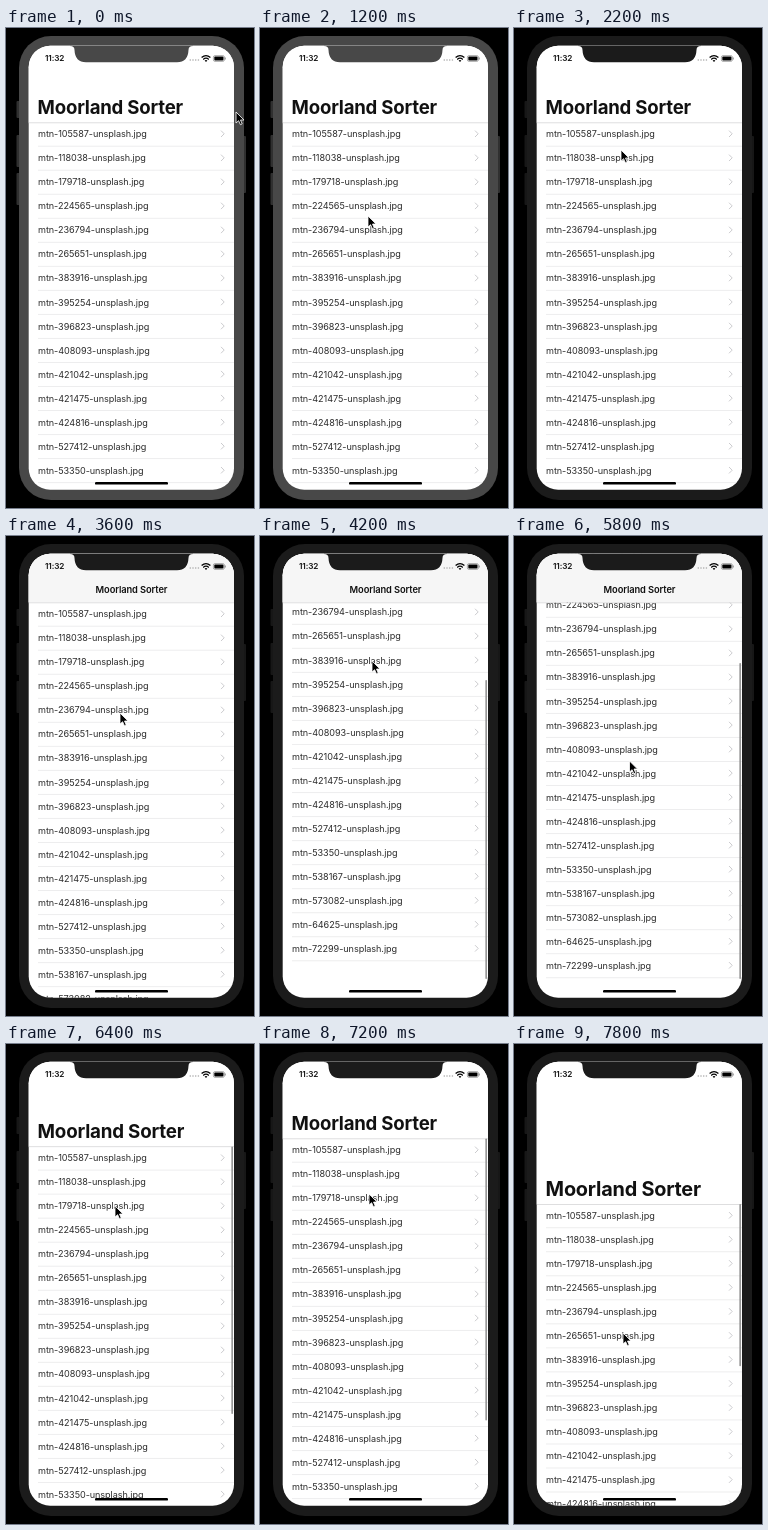
Animation of 248 by 480 pixels, one loop 8 s. Source, as an HTML page:

```html
<!DOCTYPE html>
<html lang="en">
<head>
<meta charset="utf-8">
<title>Phone list scrolling</title>
<style>
  html, body { margin: 0; width: 100%; height: 100%; overflow: hidden; background: #000; }
  svg { display: block; width: 100%; height: 100%; }
  text { font-family: Inter, Roboto, sans-serif; fill: #111; }
  .row text { font-size: 9.1px; letter-spacing: -.07px; fill: #2c2c2c; }
  .row path { fill: none; stroke: #c6c6c9; stroke-width: .9; }
  .row line { stroke: #e6e6e7; stroke-width: .7; }
  #bigTitle { font-size: 18.6px; font-weight: 700; letter-spacing: -.2px; }
  #smallTitle { font-size: 9.3px; font-weight: 600; letter-spacing: -.1px; text-anchor: middle; }
  .clock { font-size: 8.2px; font-weight: 600; letter-spacing: -.1px; }
</style>
</head>
<body>
<svg viewBox="0 0 248 480">
  <defs>
    <clipPath id="screen"><rect x="22.7" y="17.8" width="205.3" height="443.9" rx="21.4"/></clipPath>
  </defs>
  <rect width="248" height="480"/>
  <g id="buttons">
    <rect x="10.5" y="73" width="4" height="17" rx="1"/>
    <rect x="10.5" y="107" width="4" height="32" rx="1"/>
    <rect x="10.5" y="145" width="4" height="32" rx="1"/>
    <rect x="236" y="108" width="4" height="57" rx="1"/>
  </g>
  <rect class="bezel" x="13" y="8" width="225" height="464" rx="32"/>
  <g clip-path="url(#screen)">
    <rect x="22" y="17" width="207" height="446" fill="#fff"/>
    <g id="list"></g>
    <rect id="header" x="22" y="17" width="207" fill="#fff"/>
    <text id="bigTitle">Moorland Sorter</text>
    <rect id="bar" x="22" y="17" width="207" height="49" fill="#f6f6f6"/>
    <text id="smallTitle" x="125.5" y="57.4">Moorland Sorter</text>
    <rect id="headerLine" x="22" width="207" height=".7" fill="#d0d0d2"/>
    <rect id="thumb" x="225.4" width="1.5" rx=".7" fill="#8c8c8c"/>
    <text class="clock" x="39" y="33.2">11:32</text>
    <g fill="#aaa">
      <circle cx="184.3" cy="32" r=".8"/><circle cx="187" cy="32" r=".8"/>
      <circle cx="189.7" cy="32" r=".8"/><circle cx="192.4" cy="32" r=".8"/>
    </g>
    <g fill="none" stroke="#000" stroke-width="1.3">
      <path d="M195.6 29.6Q200 25.6 204.4 29.6M197.2 31.4Q200 29 202.8 31.4"/>
      <path d="M198.6 32.4L200 34L201.4 32.4Q200 31.4 198.6 32.4Z" fill="#000" stroke="none"/>
      <rect x="207.4" y="27.6" width="11" height="5.8" rx="1.6" stroke="#777" stroke-width=".6"/>
      <rect x="208.3" y="28.5" width="9.2" height="4" rx=".9" fill="#000" stroke="none"/>
      <path d="M219.3 29.5v2" stroke="#777" stroke-width=".8"/>
    </g>
    <rect x="89" y="454.1" width="73" height="2.5" rx="1.2"/>
    <path class="bezel" d="M64 17V18Q68.5 18 68.5 22Q69 34.3 80 34.3H171Q182 34.3 182.5 22Q182.5 18 187 18V17Z"/>
  </g>
  <g id="cursor">
    <path d="M0 0V11L2.6 8.7L4.4 12.7L6.2 11.9L4.5 8H8Z" stroke="#fff" stroke-width=".8" stroke-linejoin="round"/>
  </g>
</svg>
<script>
const LOOP = 8000, STEP = 200, ROW = 24.03;
const COLLAPSE = 28, MAX_SCROLL = 109, LIST_END = 443;
const $ = id => document.getElementById(id);
const set = (id, attrs) => {
  for (const name in attrs) $(id).setAttribute(name, attrs[name]);
};
const clamp = v => Math.min(1, Math.max(0, v));
const span = (t, from, to) => clamp((t - from) / (to - from));
const smooth = p => p * p * (3 - 2 * p);
const backOut = (p, bounce) => 1 + (bounce + 1) * (p - 1) ** 3 + bounce * (p - 1) ** 2;

const photos = `105587 118038 179718 224565 236794 265651 383916 395254 396823 408093
  421042 421475 424816 527412 53350 538167 573082 64625 72299`.split(/\s+/);
$('list').innerHTML = photos.map((id, i) => `
  <g class="row" transform="translate(0 ${105.8 + i * ROW})">
    <text x="32" y="3.5">mtn-${id}-unsplash.jpg</text>
    <path d="M215 -3.2L218.2 0L215 3.2"/>
    <line x1="32" x2="229" y1="12.4" y2="12.4"/>
  </g>`).join('');

// Collapse, flick to the end, flick back to the top, pull down.
function scrollAt(t) {
  return (t >= 2400 ? COLLAPSE : 0)
    + (MAX_SCROLL - COLLAPSE) * backOut(span(t, 3600, 4600), 2.85)
    - MAX_SCROLL * backOut(span(t, 5800, 7000), 1.58)
    - 65.5 * span(t, 7200, 7800);
}

const stops = [
  { t: 0, x: 230, y: 84 },
  { t: 1200, x: 108, y: 188 },
  { t: 2200, x: 107, y: 122 },
  { t: 3000, x: 112, y: 236 },
  { t: 3600, x: 114, y: 177 },
  { t: 4200, x: 112, y: 125 },
  { t: 5800, x: 115.5, y: 225 },
  { t: 6400, x: 109, y: 162 },
  { t: 7200, x: 109, y: 150 },
  { t: 7800, x: 109, y: 289 }
];
function cursorAt(t) {
  const pos = { ...stops[0] };
  stops.slice(1).forEach((stop, i) => {
    const prev = stops[i], p = smooth(span(t, prev.t, stop.t));
    pos.x += (stop.x - prev.x) * p;
    pos.y += (stop.y - prev.y) * p;
  });
  return pos;
}

function drawThumb(t, scroll, top) {
  const visible = (t > 3600 && t <= 4600) || t >= 5800;
  const over = Math.max(0, -scroll), under = Math.max(0, scroll - MAX_SCROLL);
  const p = clamp(scroll / MAX_SCROLL);
  const height = 282 + 34 * p - 1.83 * over - under;
  set('thumb', { y: top + (LIST_END - height - top) * p, height, opacity: +visible });
}

function draw(t) {
  const scroll = scrollAt(t), cursor = cursorAt(t);
  const top = 94.5 - Math.min(scroll, COLLAPSE);
  const compact = scroll > 20, active = t >= 1800;
  const scale = 1 + Math.max(0, -scroll) * .00105;

  set('list', { transform: `translate(0 ${-scroll})` });
  set('header', { height: top - 17 });
  set('headerLine', { y: top });
  set('bigTitle', { transform: `translate(31.6 ${86 - scroll}) scale(${scale})`, opacity: +!compact });
  set('bar', { opacity: +compact });
  set('smallTitle', { opacity: +compact });
  drawThumb(t, scroll, top);
  set('cursor', { transform: `translate(${cursor.x} ${cursor.y})` });
  set('buttons', { fill: active ? '#171717' : '#303030' });
  document.querySelectorAll('.bezel').forEach(el => el.setAttribute('fill', active ? '#1b1b1b' : '#484848'));
}

function tick() {
  draw(Math.floor(performance.now() % LOOP / STEP) * STEP);
  requestAnimationFrame(tick);
}
tick();
</script>
</body>
</html>
```
